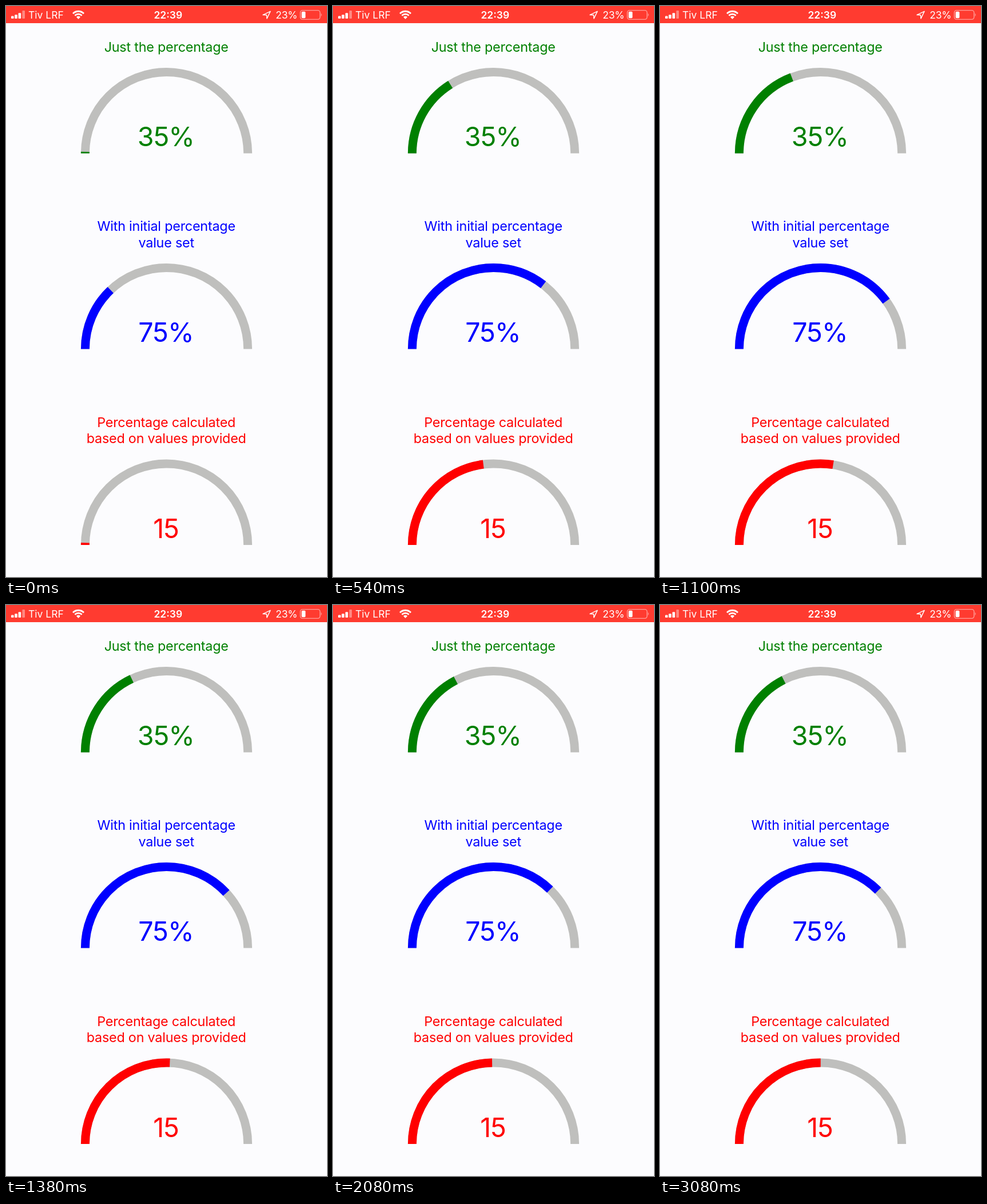
Animation, 561 px wide and 998 px high, one loop 3100 ms. Source, as an HTML page:

```html
<!DOCTYPE html>
<html lang="en">
<head>
<meta charset="utf-8">
<title>Semicircle gauges</title>
<style>
  html, body { margin: 0; width: 100%; height: 100%; overflow: hidden; background: #fcfcfe; }
  svg { display: block; width: 100%; height: 100%; }
  text { font-family: Inter, "Liberation Sans", sans-serif; }
  .title { font-size: 23.3px; letter-spacing: -.19px; text-anchor: middle; }
  .value { font-size: 46.5px; letter-spacing: -.9px; text-anchor: middle; }
  .status text { font-size: 17.5px; fill: #fff; }
  .ring { fill: none; stroke-width: 15; }
</style>
</head>
<body>
<svg id="stage" viewBox="0 0 561 998" xmlns="http://www.w3.org/2000/svg">
  <rect width="561" height="998" fill="#fcfcfe"/>
  <g class="status">
    <rect width="561" height="30" fill="#ff3b30"/>
    <g fill="#fff">
      <rect x="9" y="17.5" width="4.6" height="4.5" rx="1"/>
      <rect x="15.2" y="15.3" width="4.6" height="6.7" rx="1"/>
      <rect x="21.6" y="12.3" width="4.6" height="9.7" rx="1"/>
      <rect x="28.4" y="8" width="4.6" height="14" rx="1" opacity=".4"/>
    </g>
    <text x="39" y="22">Tiv LRF</text>
    <g fill="none" stroke="#fff" stroke-width="2.8">
      <path d="M117 13.2A13.4 13.4 0 0 1 136 13.2"/>
      <path d="M120.4 16.7A8.6 8.6 0 0 1 132.6 16.7"/>
      <path d="M126.5 23L123 19.3A5 5 0 0 1 130 19.3Z" fill="#fff" stroke="none"/>
    </g>
    <text x="283.3" y="22" text-anchor="middle" font-weight="600">22:39</text>
    <path d="M449 15.6L462 9.4L456 22L455.4 15.8Z" fill="none" stroke="#fff" stroke-width="1.5" stroke-linejoin="round"/>
    <text x="471.3" y="22" letter-spacing="-.3">23%</text>
    <rect x="514.4" y="7.6" width="34.4" height="15.8" rx="3.8" fill="none" stroke="#fff" stroke-width="1.4" opacity=".5"/>
    <path d="M550.5 12.6Q553.2 15.5 550.5 18.4Z" fill="#fff" opacity=".5"/>
    <rect x="516.6" y="9.8" width="6.8" height="11.4" rx="1.6" fill="#fff"/>
  </g>
</svg>
<script>
const CENTER = 280.5, RADIUS = 142.1, LINE_HEIGHT = 28.4, LOOP = 3100;
const stage = document.getElementById('stage');

function add(name, attrs, content = '') {
  const node = document.createElementNS('http://www.w3.org/2000/svg', name);
  for (const key in attrs) node.setAttribute(key, attrs[key]);
  node.textContent = content;
  return stage.appendChild(node);
}

function makeGauge({ color, base, lines, label, from, to }) {
  lines.forEach((line, i) => add('text', {
    class: 'title', x: CENTER - .3, y: base - 177.8 - LINE_HEIGHT * (lines.length - 1 - i), fill: color
  }, line));
  const d = `M${CENTER - RADIUS} ${base}a${RADIUS} ${RADIUS} 0 0 1 ${2 * RADIUS} 0`;
  add('path', { class: 'ring', d, stroke: '#bfbfbd' });
  const arc = add('path', { class: 'ring', d, stroke: color, pathLength: 100 });
  add('text', { class: 'value', x: CENTER - 1, y: base - 12.3, fill: color }, label);
  return { arc, from, to };
}

const gauges = [
  { color: '#008000', base: 257.5, lines: ['Just the percentage'], label: '35%', from: 0, to: 35 },
  { color: '#0000ff', base: 599.5, lines: ['With initial percentage', 'value set'], label: '75%', from: 25, to: 75 },
  { color: '#ff0000', base: 942, lines: ['Percentage calculated', 'based on values provided'], label: '15', from: 0, to: 50 }
].map(makeGauge);

// Underdamped spring released from rest, moving from 0 to 1.
function spring(seconds, stiffness = 129.69, damping = 12.379) {
  const decay = damping / 2;
  const omega = Math.sqrt(stiffness - decay * decay);
  const phase = omega * seconds;
  return 1 - Math.exp(-decay * seconds) * (Math.cos(phase) + decay / omega * Math.sin(phase));
}

// Steps of 1/60 s are shown for 20, 100 and 20 ms in turn.
function stepAt(ms) {
  const rest = ms % 140;
  return 3 * Math.floor(ms / 140) + (rest >= 20) + (rest >= 120);
}

function render(ms) {
  const progress = spring((stepAt(ms) + 1) / 60);
  for (const { arc, from, to } of gauges) {
    arc.setAttribute('stroke-dasharray', `${from + (to - from) * progress} 200`);
  }
}

let start;
function tick(now) {
  start ??= now;
  render((now - start) % LOOP);
  requestAnimationFrame(tick);
}
render(0);
requestAnimationFrame(tick);
</script>
</body>
</html>
```
